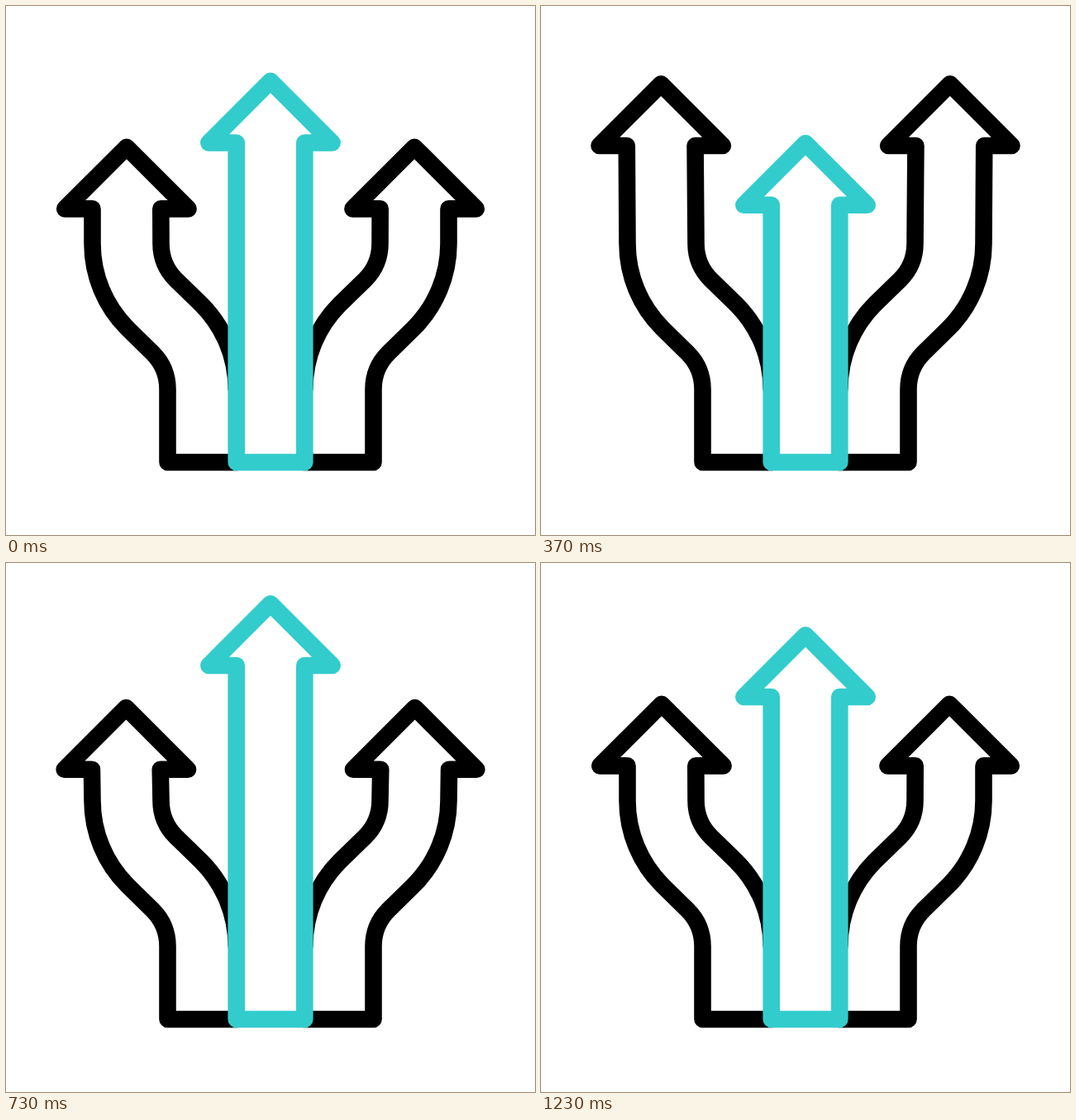
An HTML page that plays this animation: 640 by 640 pixels, repeating every 1.67 s.

```html
<!DOCTYPE html>
<html lang="en">
<head>
<meta charset="utf-8">
<title>Three arrows</title>
<style>
  html, body { margin: 0; width: 100%; height: 100%; overflow: hidden; background: #fff; }
  svg { display: block; width: 100vw; height: 100vh; }
  path { fill: none; stroke: #000; stroke-width: 20.6; stroke-linecap: round; stroke-linejoin: round; }
  #mid { stroke: #33cccc; }
</style>
</head>
<body>
<svg viewBox="0 0 640 640">
  <path id="left"/>
  <path id="right" transform="matrix(-1 0 0 1 640 0)"/>
  <path id="mid"/>
</svg>
<script>
const LOOP = 1670, FPS = 30, HEAD = 74.7;

// Keys are [frame, value]
const midY = [[-1.2, 162], [7.8, 261], [19.9, 120.8], [30.75, 162]];
const sideY = [[2.9, 245.4], [13.1, 161.8], [26.1, 272.7], [37, 245.4]];
const sideX = [[2.9, 0], [13.1, -0.8], [26.1, -0.5], [37, 0]];

const [left, right, mid] = ['left', 'right', 'mid'].map(id => document.getElementById(id));

// Cubic ease with handles at 0.42 and 0.58
function ease(x) {
  let lo = 0, hi = 1;
  for (let i = 0; i < 24; i++) {
    const s = (lo + hi) / 2, r = 1 - s;
    if (1.26 * r * r * s + 1.74 * r * s * s + s * s * s < x) lo = s; else hi = s;
  }
  return lo * lo * (3 - 2 * lo);
}

function valueAt(keys, f) {
  if (f <= keys[0][0]) return keys[0][1];
  for (let i = 1; i < keys.length; i++) {
    const [f0, a] = keys[i - 1], [f1, b] = keys[i];
    if (f < f1) return a + (b - a) * ease((f - f0) / (f1 - f0));
  }
  return keys[keys.length - 1][1];
}

// Arrow head from the left leg to the right leg, base at height y
function head(x, y, leg) {
  return `L${x - leg} ${y}H${x - HEAD}L${x} ${y - HEAD}L${x + HEAD} ${y}H${x + leg}`;
}

function sidePath(dx, y) {
  return 'M278.7 552H195.5V463.5A62 62 0 0 0 177.3 419.7L147 390A145 145 0 0 1 104.5 287.5' +
    head(145.9 + dx, y, 41.4) +
    'L187.5 287.5A62 62 0 0 0 205.7 331.3L236.2 360.8A145.2 145.2 0 0 1 278.7 463.5';
}

function draw(ms) {
  const tick = Math.floor(ms / 10) * 10;
  const f = Math.floor((tick + 3.4) * FPS / 1000);
  const side = sidePath(valueAt(sideX, f), valueAt(sideY, f));
  left.setAttribute('d', side);
  right.setAttribute('d', side);
  mid.setAttribute('d', 'M278.7 552' + head(320, valueAt(midY, f), 41.3) + 'V552Z');
}

const start = performance.now();
function loop() {
  draw((performance.now() - start) % LOOP);
  requestAnimationFrame(loop);
}
draw(0);
requestAnimationFrame(loop);
</script>
</body>
</html>
```
